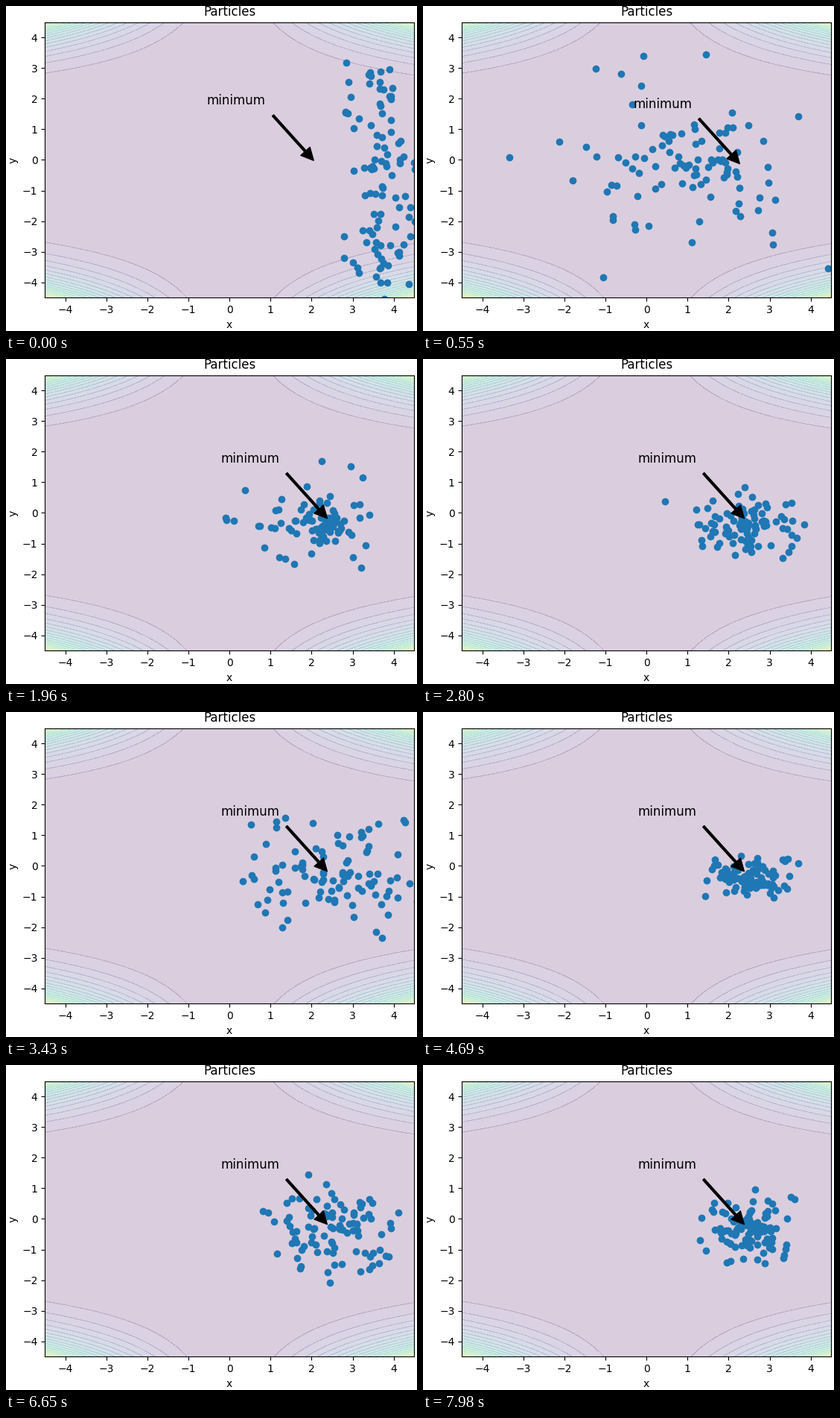
Recreate the animation shown at these times as a matplotlib script. Size 552 by 436 pixels, loop 8000 ms.

```python
import numpy as np
import matplotlib.pyplot as plt
from matplotlib.animation import FuncAnimation

W, H, DPI = 552, 436, 100
LOOP, INTERVAL, STEP = 8000, 40, 70      # ms
LAST = LOOP // STEP
COUNT = 96
LIM = 4.5

rng = np.random.default_rng(8)
START, GOAL = np.array([2.18, -0.21]), np.array([2.51, -0.37])

# breathing of the swarm: step, drift x, drift y, radius x, radius y, crowding
BREATH = np.array([
    (0, 1.2, 0.1, 0.9, 4.4, 0.1),
    (5, -2.0, 0.2, 4.0, 4.8, 0.3),
    (16, -2.0, 0.1, 4.2, 3.2, 2.0),
    (40, -0.2, 0.0, 1.9, 1.5, 0.5),
    (49, 0.2, -0.1, 2.6, 2.4, 0.25),
    (67, 0.0, 0.0, 1.4, 0.9, 0.5),
    (79, 0.0, 0.0, 2.1, 2.2, 0.3),
    (95, 0.0, 0.1, 1.8, 2.0, 0.25),
    (LAST, 0.0, 0.0, 1.25, 1.4, 0.3),
])

# each particle has a rank and, per axis, two waves of its own
rank = rng.random((COUNT, 1))
speed = rng.uniform(0.15, 0.45, (2, COUNT, 2))
phase = rng.uniform(0, 2 * np.pi, (2, COUNT, 2))


def beale(x, y):
    return ((1.5 - x + x * y) ** 2 + (2.25 - x + x * y ** 2) ** 2
            + (2.625 - x + x * y ** 3) ** 2)


def particles(step):
    dx, dy, rx, ry, crowd = (np.interp(step, BREATH[:, 0], col)
                             for col in BREATH.T[1:])
    wave = np.sin(speed * step + phase).mean(axis=0)
    return GOAL + rank ** crowd * ((dx, dy) + wave * (rx, ry))


def best(step):
    """Best point so far: settles in three jumps."""
    return START + (GOAL - START) * min(step // 3, 3) / 3


fig = plt.figure(figsize=(W / DPI, H / DPI), dpi=DPI)
ax = fig.add_axes([52.2 / W, 44.7 / H, 496 / W, 369.6 / H])
grid = np.linspace(-LIM, LIM, 100)
X, Y = np.meshgrid(grid, grid)
ax.contourf(X, Y, beale(X, Y), levels=np.arange(0, 190001, 10000), alpha=0.2)
ax.set(xlim=(-LIM, LIM), ylim=(-LIM, LIM), xlabel="x", ylabel="y",
       title="Particles")

dots, = ax.plot([], [], "o", color="tab:blue")
note = ax.annotate("minimum", xy=START, xytext=(0, 0), fontsize=12,
                   arrowprops=dict(facecolor="black", width=2, shrink=0.1))


def draw(i):
    step = min((i * INTERVAL + 30) // STEP, LAST)
    dots.set_data(*particles(step).T)
    note.xy = best(step)
    note.set_position(note.xy + (-2.73, 2.02))
    return dots, note


anim = FuncAnimation(fig, draw, frames=LOOP // INTERVAL, interval=INTERVAL,
                     init_func=lambda: draw(0), repeat=True, repeat_delay=0)
plt.show()
```
